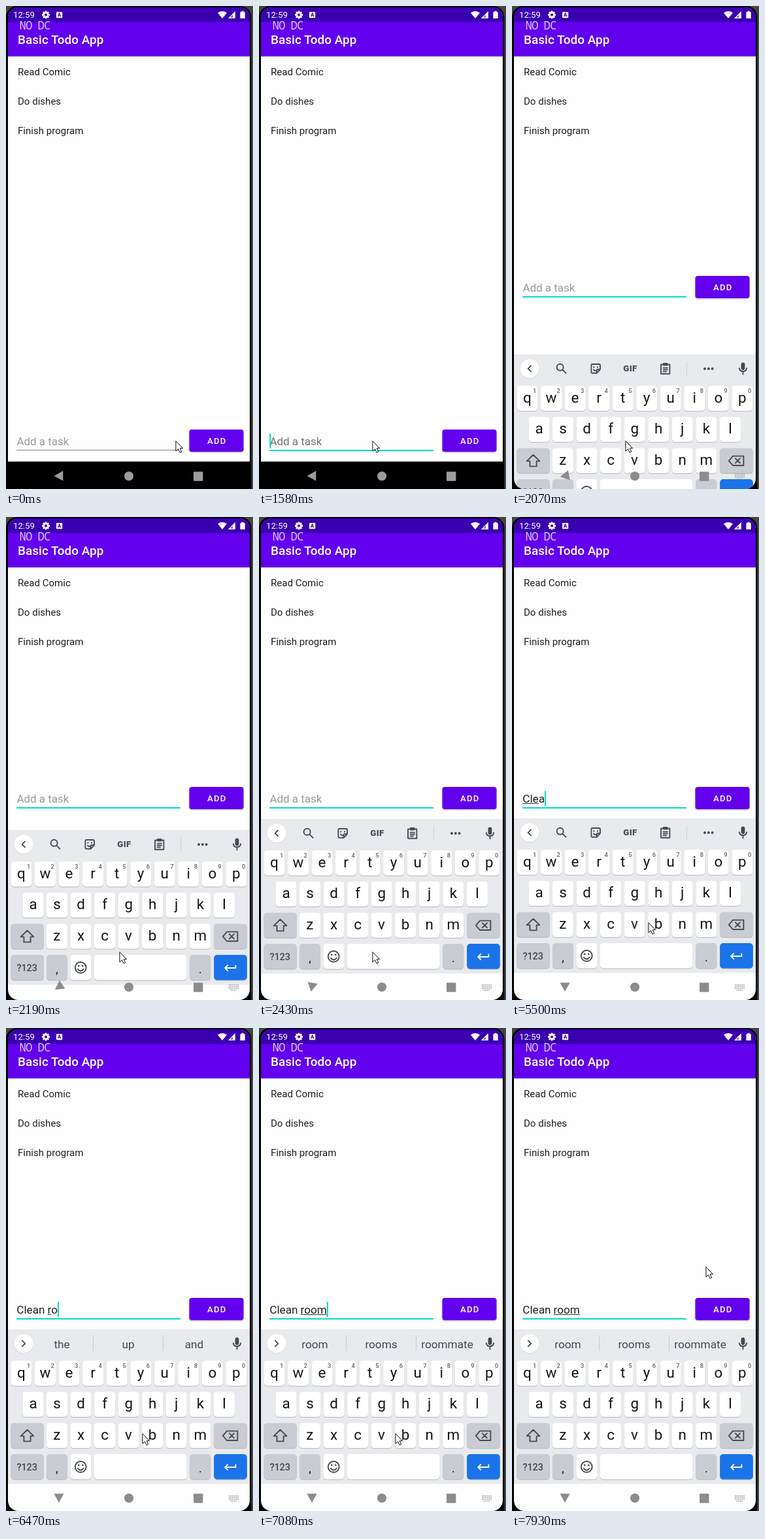
An HTML page that plays this animation: 378 px wide and 739 px high, repeating every 8 s.

```html
<!DOCTYPE html>
<html lang="en">
<head>
<meta charset="utf-8">
<title>Todo app</title>
<style>
  html, body { margin: 0; width: 100%; height: 100%; overflow: hidden; background: #000; }
  svg { display: block; position: absolute; left: 0; top: 0; }
  text { font-family: Roboto, sans-serif; white-space: pre; }
  .item { font-size: 15.06px; fill: #1f1f1f; }
  .mid { text-anchor: middle; }
  .line { fill: none; stroke: #484c50; stroke-width: 1.9; stroke-linejoin: round; stroke-linecap: round; }
  .raised { filter: drop-shadow(0 1px 1px rgba(0, 0, 0, .35)); }
</style>
</head>
<body>
<svg id="stage" width="378" height="739" viewBox="0 0 378 739">
  <defs>
    <clipPath id="screen"><rect x="3" y="2" width="370" height="737" rx="16"/></clipPath>
  </defs>
  <rect width="378" height="739" fill="#444446"/>
  <rect width="375.5" height="780" rx="17"/>
  <g clip-path="url(#screen)">
    <rect x="3" y="2" width="370" height="695" fill="#fefefe"/>
    <rect x="3" y="77" width="370" height="1" fill="#d9d9dd"/>
    <rect x="3" y="2" width="370" height="75" fill="#6200ee"/>
    <rect x="3" y="2" width="370" height="22.6" fill="#3a00b0"/>

    <g fill="#fff">
      <text x="11" y="18" font-size="13.2">12:59</text>
      <g id="gear" transform="translate(61 13.5)"></g>
      <rect x="77" y="9" width="9.2" height="9.2" rx="1"/>
      <path d="M324 10.4Q331 5.8 338 10.4L331 19Z"/>
      <path d="M350.8 8V19H340Z" fill-opacity=".35"/>
      <path d="M350.8 8V19H340ZM349.6 10.9L342.8 17.8H347V13.6Z" fill-rule="evenodd"/>
      <path d="M358.4 9.2H360.3V7.8H363.8V9.2H365.7V19H358.4Z"/>
      <text x="18" y="58" font-size="18.9" font-weight="500" letter-spacing=".05">Basic Todo App</text>
    </g>
    <path d="M79.4 16.4L81.6 10.8L83.8 16.4M80.2 14.7H83" fill="none" stroke="#3a00b0" stroke-width="1.2"/>
    <text x="20.6" y="36" font-size="17.4" letter-spacing="-1.1" style="font-family:'Noto Sans Mono',monospace;font-stretch:extra-condensed" font-weight="100" fill="#d9c4fa">NO DC</text>

    <text class="item" x="18" y="105.8">Read Comic</text>
    <text class="item" x="18" y="151">Do dishes</text>
    <text class="item" x="18" y="196.2">Finish program</text>

    <g id="form">
      <rect class="raised" x="280.5" y="413" width="83" height="34" rx="3.8" fill="#6200ee"/>
      <text x="308" y="435" font-size="13.18" font-weight="500" letter-spacing="1.18" fill="#fff">ADD</text>
      <rect id="rule" x="16" width="251"/>
      <text id="hint" x="16.5" y="437" font-size="16.95">Add a task</text>
      <text id="typed" x="16.3" y="437" font-size="17.1" fill="#202020"></text>
      <rect id="mark" y="438" height="1" fill="#303030"/>
      <rect id="caret" y="419" width="2" height="23" fill="#03dac5"/>
    </g>

    <rect id="navDark" x="3" y="697" width="370" height="42"/>
    <g id="board">
      <rect x="3" y="461" width="370" height="237" fill="#e8eaed"/>
      <rect x="3" y="697.5" width="370" height="42" fill="#fefefe"/>
      <circle cx="27" cy="483.6" r="14.5" fill="#c9cccf"/>
      <circle cx="27" cy="482.8" r="14.4" fill="#fff"/>
      <path id="chevron" class="line"/>
      <g id="tools">
        <circle class="line" cx="73.6" cy="480.8" r="5"/>
        <path class="line" d="M77.4 484.6L82.6 489.8"/>
        <path class="line" d="M123 476H133.2Q135 476 135 478V484L129.6 489.8H123Q121.4 489.8 121.4 488V477.6Q121.4 476 123 476ZM135 484H131.4Q129.6 484 129.6 486V489.8M125 484.4Q127 487 129 485.4"/>
        <path d="M124.4 479.4h2v2h-2zM130 479.4h2v2h-2z" fill="#484c50"/>
        <text class="mid" x="181" y="487.2" font-size="13.2" font-weight="900" letter-spacing=".4" fill="#484c50">GIF</text>
        <path class="line" d="M228 476.5H241.4V490.8H228ZM231.5 481.6H238M231.5 484.5H238M231.5 487.4H236"/>
        <rect x="231" y="474" width="7.4" height="4.4" rx="1" fill="#484c50"/>
        <rect x="267" y="472" width="1" height="22" fill="#cfd2d6"/>
        <path d="M295 483h.01M300.8 483h.01M306.6 483h.01" stroke="#484c50" stroke-width="4" stroke-linecap="round"/>
      </g>
      <g id="words" font-size="17.2" fill="#44484c">
        <rect x="133" y="471" width="1" height="23" fill="#c8cbcf"/>
        <rect x="240" y="471" width="1" height="23" fill="#c8cbcf"/>
      </g>
      <rect x="350.6" y="473.6" width="5.8" height="11.4" rx="2.9" fill="#44484c"/>
      <path class="line" d="M347.8 482.2A5.8 5.8 0 0 0 359.2 482.2M353.5 488.2V491.4"/>
      <g id="keys"></g>
      <path class="line" d="M32.5 614.8L42.4 624.4H37.6V632.4H27.4V624.4H22.6Z"/>
      <path class="line" d="M338 616.6H354.4V631H338L331.9 623.8ZM341.8 620.2L349 627.4M349 620.2L341.8 627.4"/>
      <circle class="line" cx="114.2" cy="671.4" r="8.4"/>
      <path class="line" d="M109.8 673.8Q114.2 679.2 118.6 673.8"/>
      <path d="M111.2 668.8h.01M117.2 668.8h.01" stroke="#484c50" stroke-width="2.8" stroke-linecap="round"/>
      <path d="M351.4 667.4V672H335.4M339.8 667.4L335.2 672L339.8 676.6" fill="none" stroke="#fff" stroke-width="1.9"/>
    </g>
    <g id="nav">
      <path id="back" d="M-7.4 0L6.3 -7.6V7.6Z"/>
      <circle cx="188" cy="719.3" r="7"/>
      <rect x="287" y="712.4" width="14.4" height="14.4" rx="1"/>
      <path id="switcher" d="M341 715.9H356M341 718.5H356M341 721.1H356M343.6 723.7H353" fill="none" stroke="#999" stroke-width="1.5" stroke-dasharray="1.6 1.05"/>
    </g>
  </g>
  <path id="pointer" d="M-.1 .6V16L3.6 12.7L6.1 18.2L8.7 17L6.2 11.7H10.6Z" fill="#fff" stroke="#111" stroke-width="1"/>
</svg>
<script>
const LOOP = 8000;
const $ = id => document.getElementById(id);

function add(parent, tag, attrs, content) {
  const node = document.createElementNS('http://www.w3.org/2000/svg', tag);
  for (const name in attrs) node.setAttribute(name, attrs[name]);
  if (content !== undefined) node.textContent = content;
  parent.append(node);
  return node;
}

function set(id, attrs) {
  for (const name in attrs) $(id).setAttribute(name, attrs[name]);
}

function show(id, on) {
  $(id).style.display = on ? '' : 'none';
}

// Gear: eight teeth around a ring
for (let i = 0; i < 4; i++) {
  add($('gear'), 'rect', { x: -1.4, y: -6, width: 2.8, height: 12, rx: .5, transform: `rotate(${i * 45})` });
}
add($('gear'), 'circle', { r: 4.5 });
add($('gear'), 'circle', { r: 2, fill: '#3a00b0' });

// Keyboard
const GREY = '#c9ccd2', BLUE = '#1a73e8', PITCH = 36.55;
const ROWS = [509, 556.7, 604.4, 652];

function key(x, row, width, fill = '#fff') {
  const box = { x, width, height: 38.4, rx: 4.8 }, y = ROWS[row];
  add($('keys'), 'rect', { ...box, y: y + 1, fill: '#b4b7bc' });
  add($('keys'), 'rect', { ...box, y, fill });
}

function label(x, y, size, content, fill = '#151515', weight = 400) {
  add($('keys'), 'text', { x, y, class: 'mid', 'font-size': size, 'font-weight': weight, fill }, content);
}

[['qwertyuiop', 23.4], ['asdfghjkl', 41.5], ['zxcvbnm', 77.9]].forEach(([letters, x0], row) => {
  [...letters].forEach((letter, i) => {
    const x = x0 + i * PITCH;
    key(x - 16, row, 32);
    label(x, ROWS[row] + 25.6, 22.4, letter);
    if (!row) label(x + 11.2, ROWS[0] + 11.4, 9.4, (i + 1) % 10, '#5f6368', 500);
  });
});
key(7.4, 2, 50.4, GREY);
key(318.2, 2, 50.6, GREY);
key(7.4, 3, 50.4, GREY);
key(61.9, 3, 32, GREY);
key(98.4, 3, 32);
key(134.7, 3, 142);
key(281.2, 3, 32, GREY);
key(318.2, 3, 50.6, BLUE);
label(32.2, 677.3, 14.4, '?123', '#44484c', 500);
label(78, 680, 18, ',');
label(297.4, 680, 18, '.');

const words = [85.5, 187, 288].map(x => add($('words'), 'text', { x, y: 489.6, class: 'mid' }));

// Step tables: [time, value]
const POINTER = [
  [0, [260, 665]], [1120, [246, 665]], [1240, [214, 665]], [1360, [184, 665]], [1460, [174, 665]],
  [2790, [180, 659]], [2910, [193, 643]], [3030, [205, 626]], [3150, [209, 620]],
  [7570, [228, 566]], [7690, [266, 440]], [7810, [291, 345]], [7930, [297, 365]]
];
const CARET = [
  [0, 0], [1580, 1], [2070, 0], [2670, 1], [3150, 0], [3650, 1], [4150, 0], [4640, 1], [7570, 0]
];
const SLIDE = [[0, 300], [1950, 190], [2070, 72], [2190, 18], [2310, 5], [2430, 1], [2550, 0]];
const TURN = [[0, 0], [2070, -10], [2190, -35], [2310, -62], [2430, -80], [2550, -88], [2670, -90]];
const TYPED = [
  [0, ''], [5140, 'C'], [5260, 'Cl'], [5380, 'Cle'], [5500, 'Clea'], [5620, 'Clean'], [5740, 'Clean '],
  [6350, 'Clean r'], [6470, 'Clean ro'], [6590, 'Clean roo'], [6710, 'Clean room']
];
// Underlined part of the typed text: first and last character
const MARK = [
  [0, [0, 0]], [5260, [0, 1]], [5380, [0, 2]], [5500, [0, 3]], [5620, [0, 4]], [5740, [0, 5]], [5980, [0, 0]],
  [6470, [6, 7]], [6590, [6, 8]], [6710, [6, 9]], [7080, [6, 10]]
];
const WORDS = [
  [0, ''], [5740, 'clean cleaning cleaner'], [5980, 'the up and'], [6710, ''],
  [6830, 'too room root'], [7080, 'room rooms roommate']
];

function at(steps, t) {
  let value;
  for (const [time, v] of steps) if (time <= t) value = v;
  return value;
}

// Horizontal position after the first n characters
function edge(n) {
  return 16.3 + (n ? $('typed').getSubStringLength(0, n) : 0);
}

function draw(t) {
  const [px, py] = at(POINTER, t);
  set('pointer', { transform: `translate(${px} ${py})` });

  const focus = t >= 1580, raised = t >= 2070;
  set('form', { transform: `translate(0 ${raised ? 0 : 235})` });
  set('rule', focus ? { y: 444, height: 2, fill: '#03dac5' } : { y: 444, height: 1, fill: '#858585' });

  const typed = at(TYPED, t);
  $('typed').textContent = typed;
  show('hint', !typed);
  set('hint', { fill: t >= 1460 && t < 1700 ? '#717171' : '#9b9b9b' });
  const [from, to] = at(MARK, t);
  const start = edge(from);
  set('mark', { x: start, width: edge(to) - start });
  show('caret', at(CARET, t));
  set('caret', { x: typed ? edge(typed.length) : 16.2 });

  show('board', t >= 1950);
  set('board', { transform: `translate(0 ${at(SLIDE, t)})` });
  const list = at(WORDS, t);
  show('tools', !list);
  show('words', list);
  list.split(' ').forEach((word, i) => { words[i].textContent = word; });
  set('chevron', { d: list ? 'M24.8 478.4L29.2 482.8L24.8 487.2' : 'M29 478.4L24.6 482.8L29 487.2' });

  set('nav', { fill: raised ? '#8c8c8c' : '#9c9c9c' });
  set('back', { transform: `translate(81 718.9) rotate(${at(TURN, t)})` });
  show('navDark', !raised);
  show('switcher', raised);
}

const begin = performance.now();
function tick() {
  draw((performance.now() - begin) % LOOP);
  requestAnimationFrame(tick);
}
tick();
</script>
</body>
</html>
```
